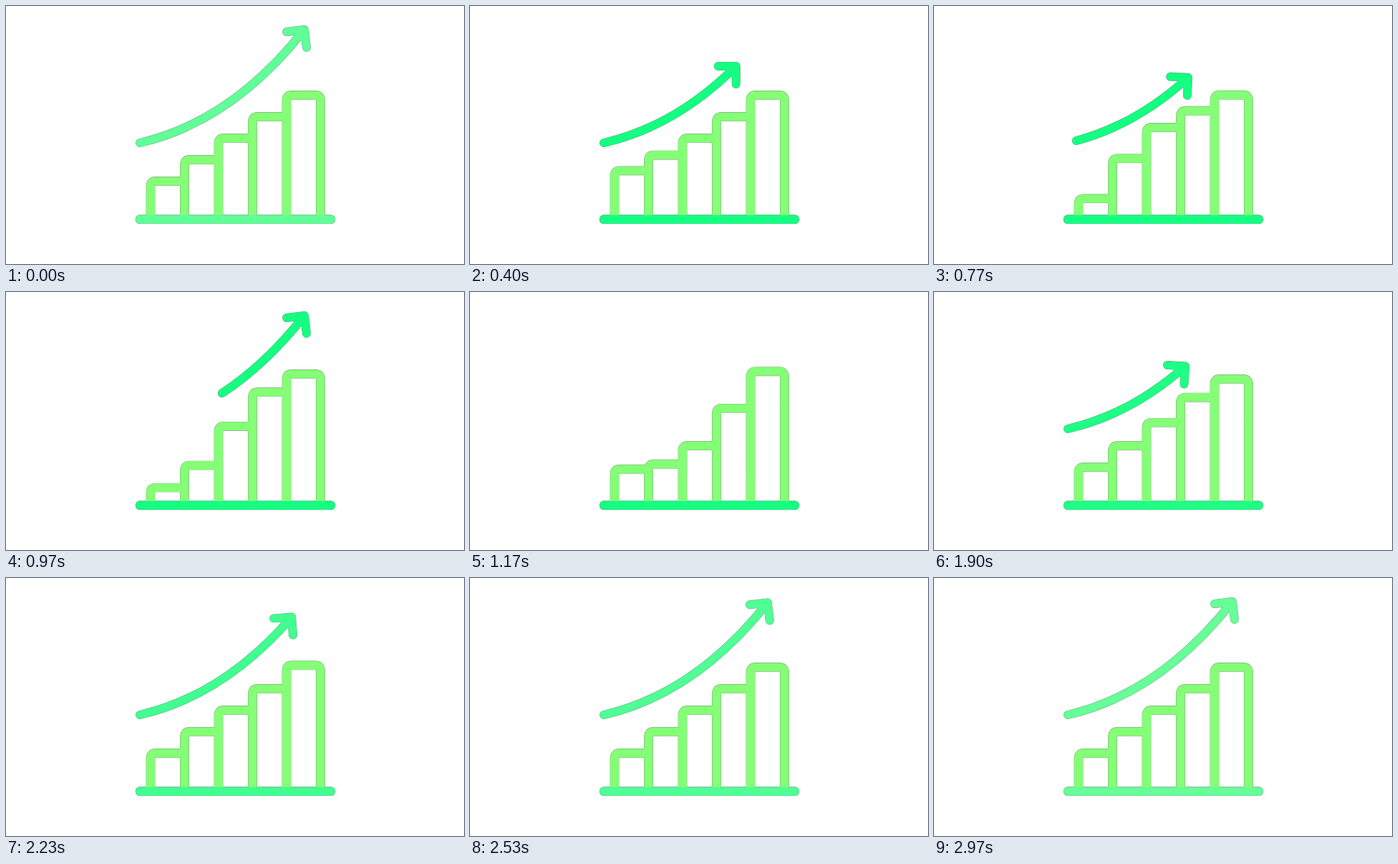
Recreate the animation shown at these times as an HTML page. Size 640 by 360 pixels, loop 3.01 s.

```html
<!DOCTYPE html>
<html lang="en">
<head>
<meta charset="utf-8">
<title>Growth chart</title>
<style>
  html, body { margin: 0; width: 100%; height: 100%; overflow: hidden; background: #fff; }
  svg { display: block; width: 100vw; height: 100vh; }
  #chart { --bar: #84ff76; }
  #fringe { --bar: #263c2b; --accent: #263c2b; --edge: .7px; opacity: .6; }
  .line { fill: none; stroke-width: calc(12px + var(--edge, 0px)); stroke-linecap: round; stroke-linejoin: round; }
  .bar { stroke: var(--bar); stroke-linecap: butt; }
  .accent { stroke: var(--accent); }
  #arrow { stroke-width: calc(11.3px + var(--edge, 0px)); }
</style>
</head>
<body>
<svg viewBox="0 0 640 360">
  <defs>
    <g id="art">
      <path id="bars" class="line bar"/>
      <path class="line accent" d="M187 297.7H454"/>
      <path id="arrow" class="line accent"/>
    </g>
  </defs>
  <use id="fringe" href="#art"/>
  <use id="chart" href="#art"/>
</svg>
<script>
const LOOP = 3010;
const chart = document.getElementById('chart');
const bars = document.getElementById('bars');
const arrow = document.getElementById('arrow');

const clamp = v => Math.max(0, Math.min(1, v));
const mix = (a, b, u) => a + (b - a) * u;
const span = (t, from, to) => clamp((t - from) / (to - from));
const sine = u => (1 - Math.cos(Math.PI * u)) / 2;

// Eased value along [time, value] keys
function track(keys, t, ease = sine) {
  if (t <= keys[0][0]) return keys[0][1];
  for (let i = 1; i < keys.length; i++) {
    const [t0, v0] = keys[i - 1], [t1, v1] = keys[i];
    if (t < t1) return mix(v0, v1, ease((t - t0) / (t1 - t0)));
  }
  return keys[keys.length - 1][1];
}

const BAR_COUNT = 5, BAR_DELAY = 170, RADIUS = 7;
const BOUNCE = [[60, 0], [440, 15], [890, -32], [1320, 8], [1690, 0]];

function barPath(i, t) {
  const left = 202 + i * 47.5, right = left + 47.5;
  const top = 244.4 - i * 30 - track(BOUNCE, t - i * BAR_DELAY);
  const start = `M${left} 297V${top + RADIUS}q0 ${-RADIUS} ${RADIUS} ${-RADIUS}`;
  return i < BAR_COUNT - 1
    ? `${start}H${right}`
    : `${start}H${right - RADIUS}q${RADIUS} 0 ${RADIUS} ${RADIUS}V297`;
}

const CURVE = [[187, 191], [316, 161], [417, 33]];

// Blossom of the quadratic: equal arguments give a point, unequal ones a control point
function blossom(a, b) {
  return [0, 1].map(k => {
    const [p, q, r] = CURVE.map(point => point[k]);
    return mix(mix(p, q, a), mix(q, r, a), b);
  });
}

function arrowPath(tail, tip, headScale) {
  const end = blossom(tip, tip);
  const heading = Math.atan2(
    mix(CURVE[1][1] - CURVE[0][1], CURVE[2][1] - CURVE[1][1], tip),
    mix(CURVE[1][0] - CURVE[0][0], CURVE[2][0] - CURVE[1][0], tip)
  );
  const barb = side => {
    const angle = heading + Math.PI + side * Math.PI / 4;
    const size = 25 * headScale;
    return [end[0] + size * Math.cos(angle), end[1] + size * Math.sin(angle)];
  };
  return `M${blossom(tail, tail)}Q${blossom(tail, tip)} ${end}M${barb(1)}L${end}L${barb(-1)}`;
}

const PULL_END = 680, EXIT = 1105, REGROW = 1380, GROWN = 2650, PULLED = 0.66;

function arrowAt(t) {
  if (t < EXIT) {
    const pull = mix(1, PULLED, sine(span(t, 0, PULL_END)));
    const launch = span(t, PULL_END, EXIT) ** 2;
    return arrowPath(launch, Math.min(1, pull + launch), 1);
  }
  if (t < REGROW) return '';
  const tip = 1 - (1 - span(t, REGROW, GROWN)) ** 2.2;
  return arrowPath(0, tip, clamp(tip / 0.15));
}

const RED = [[0, 96], [350, 20], [1800, 20], [2230, 64], [2970, 102], [LOOP, 96]];

function render(t) {
  const red = track(RED, t, u => u);
  chart.style.setProperty('--accent', `rgb(${red} 255 ${mix(130, 152, span(red, 20, 90))})`);
  bars.setAttribute('d', Array.from({ length: BAR_COUNT }, (_, i) => barPath(i, t)).join(''));
  arrow.setAttribute('d', arrowAt(t));
}

const begin = performance.now();
function tick() {
  render((performance.now() - begin) % LOOP);
  requestAnimationFrame(tick);
}
tick();
</script>
</body>
</html>
```
